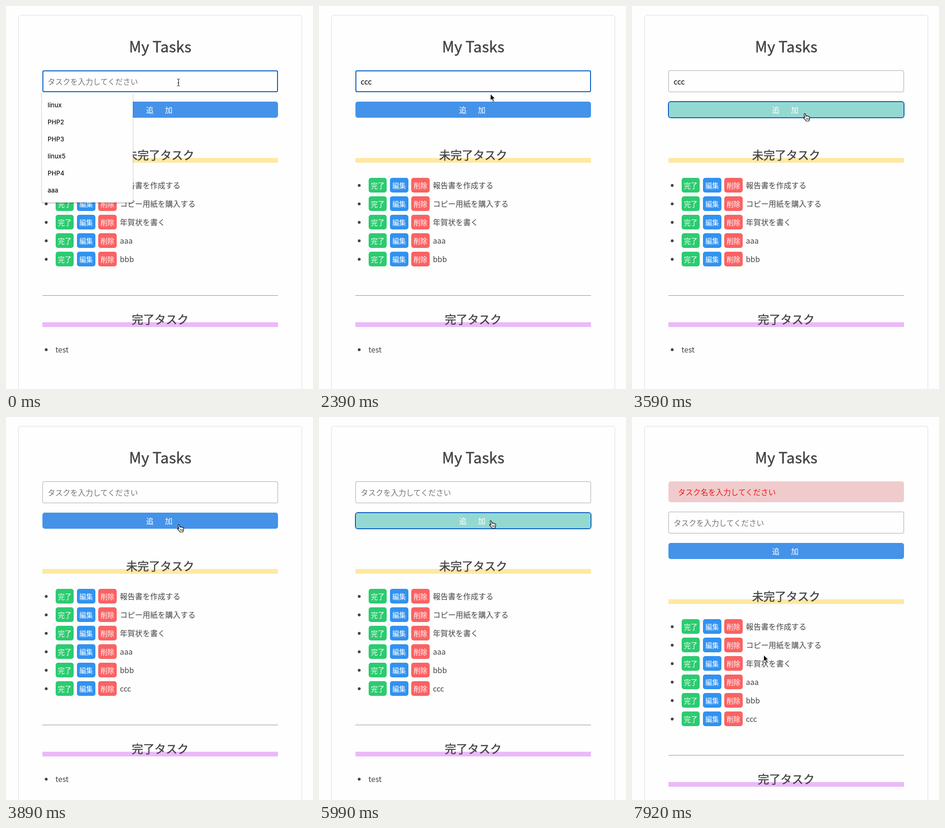
Animation, 649 px wide and 809 px high, one loop 8000 ms. Source, as an HTML page:

```html
<!DOCTYPE html>
<html lang="ja">
<head>
<meta charset="utf-8">
<title>My Tasks</title>
<style>
html, body { margin: 0; width: 100%; height: 100%; overflow: hidden; background: #fefefe; }
#stage { position: relative; width: 649px; height: 809px; overflow: hidden;
  font: 16px/30px "Noto Sans CJK JP", "Noto Sans CJK", "Noto Sans", sans-serif; color: #444; }
#stage * { box-sizing: border-box; }
#stage div, #stage svg { position: absolute; white-space: pre; }
#card { left: 26px; top: 19px; width: 600px; height: 900px; border: 1px solid #ddd; border-radius: 5px; }
#page, #lower { left: 0; top: 0; width: 649px; height: 900px; }
.wide { left: 77px; width: 498px; }
.head { text-align: center; -webkit-text-stroke: .55px #444; }
#title { top: 60px; line-height: 48px; font-size: 32px; }
#error { top: 136px; height: 44px; padding-left: 20px; border-radius: 5px;
  background: #f0cbcc; color: #f0161c; line-height: 44px; }
#field { top: 136px; height: 46px; padding-left: 10px; border: 1px solid #aaa; border-radius: 3px;
  color: #000; line-height: 44px; }
#field.empty { color: #757575; }
#field.focus { padding-left: 9px; border: 2px solid #0a5fc4; line-height: 42px; }
#caret { top: 147px; width: 1px; height: 24px; background: #000; }
#add { top: 202px; height: 34px; border-radius: 5px; background: #4493e9; color: #fff;
  text-align: center; line-height: 34px; letter-spacing: 4px; }
#add.hover { background: #94d9d1; }
#add.ring { box-shadow: 0 0 0 1px #0a5fc4, inset 0 0 0 1px #0a5fc4; }
.band { height: 10.5px; }
.sub { font-size: 24px; line-height: 36px; }
.row { left: 0; width: 600px; height: 31px; line-height: 31px; }
.dot { left: 82px; top: 13px; width: 6px; height: 6px; border-radius: 50%; background: #444; }
.btn { top: 0; width: 38.8px; height: 31px; border-radius: 5px; color: #fff;
  font-size: 14.4px; line-height: 31px; text-align: center; }
.label { top: 0; }
#rule { top: 611px; height: 1px; background: #929292; }
#drop { left: 76px; top: 183px; width: 192px; padding: 8px 12px; background: #fefefe;
  border-radius: 0 0 4px 4px; box-shadow: 0 1px 3px rgba(0,0,0,.4);
  clip-path: inset(0 -5px -5px -5px); color: #111;
  font: 500 13px/36px Inter, "Liberation Sans", sans-serif; letter-spacing: .1px; }
#stage svg { left: 0; top: 0; width: 18px; height: 20px; overflow: visible; }
</style>
</head>
<body>
<div id="stage">
  <div id="card"></div>
  <div id="title" class="wide head">My Tasks</div>
  <div id="error" class="wide">タスク名を入力してください</div>
  <div id="page">
    <div id="field" class="wide"></div>
    <div id="caret"></div>
    <div id="add" class="wide">追　加</div>
    <div class="wide band" style="top:320.5px;background:#ffe8a1"></div>
    <div class="wide head sub" style="top:296px">未完了タスク</div>
    <div id="lower">
      <div id="rule" class="wide"></div>
      <div class="wide band" style="top:667.5px;background:#ebb9f9"></div>
      <div class="wide head sub" style="top:643px">完了タスク</div>
    </div>
  </div>
  <div id="drop"></div>
  <svg id="beam" fill="none" stroke-linecap="round">
    <g id="beamLine"><path d="M1 1Q3.5 1 3.5 3Q3.5 1 6 1M3.5 3V14M1 16Q3.5 16 3.5 14Q3.5 16 6 16M2.2 9.5H4.8"/></g>
  </svg>
  <svg id="arrow"><path d="M1.5 1V14.3L4.6 11.4 6.8 16.8 9.1 15.8 6.9 10.6H11.2Z" fill="#000" stroke="#fff"
    style="filter:drop-shadow(0 1px 1px rgba(0,0,0,.3))"/></svg>
  <svg id="hand" stroke="#000" stroke-linecap="round" stroke-linejoin="round">
    <path fill="#fff" stroke-width="1.2" d="M4.8 10.2 2.8 3.4C2.2 1 4.8.3 5.5 2.5L6.8 6.8C7.3 5.4 9.3 5.7 9.5 7 10.2 6 12 6.4 12.1 7.8 13 7 14.4 7.6 14.5 9V12C14.5 14 13.2 15 13 17H6.8C6.2 14.9 3 12.6 1.6 10.4 1 8.8 2.8 8.2 4.8 10.2Z"/>
    <path fill="none" stroke-width=".9" d="M7.8 11V14M9.9 11V14M12 11V14"/>
  </svg>
</div>
<script>
const $ = id => document.getElementById(id);
const LOOP = 8000;
const HINT = 'タスクを入力してください';
const PAST = ['linux', 'PHP2', 'PHP3', 'linux5', 'PHP4', 'aaa'];
const BUTTONS = [['完了', '#2ccb70'], ['編集', '#3192f0'], ['削除', '#fa6263']];
const TASKS = ['報告書を作成する', 'コピー用紙を購入する', '年賀状を書く', 'aaa', 'bbb', 'ccc'];

function div(parent, cls, style = {}, text = '') {
  const el = document.createElement('div');
  el.className = cls;
  el.textContent = text;
  Object.assign(el.style, style);
  return parent.appendChild(el);
}

function addRow(parent, top, text, buttons) {
  const row = div(parent, 'row', { top: top + 'px' });
  div(row, 'dot');
  buttons.forEach(([name, color], i) =>
    div(row, 'btn', { left: 104.7 + 45.2 * i + 'px', background: color }, name));
  div(row, 'label', { left: (buttons.length ? 240.7 : 104.5) + 'px' }, text);
  return row;
}

const rows = TASKS.map((task, i) => addRow($('page'), 363 + 39 * i, task, BUTTONS));
addRow($('lower'), 710, 'test', []);

// White halo under the text cursor
const line = $('beamLine').firstElementChild;
const halo = line.cloneNode();
halo.setAttribute('stroke', '#fff');
halo.setAttribute('stroke-width', 2.4);
line.setAttribute('stroke', '#000');
line.before(halo);

// Each step changes part of the state; caret 0 means hidden
const start = {
  text: '', drop: PAST, focus: true, caret: 0, hover: false, ring: false,
  added: false, error: false, cursor: ['beam', 361, 153]
};
const steps = [
  [600, { caret: 88 }],
  [1050, { caret: 0 }],
  [1500, { text: 'c', caret: 96, drop: ['ccc'] }],
  [1640, { text: 'cc', caret: 103 }],
  [1790, { text: 'ccc', caret: 111, drop: [] }],
  [2240, { caret: 0 }],
  [2390, { cursor: ['arrow', 361, 185] }],
  [2540, { hover: true, cursor: ['hand', 361, 224] }],
  [2690, { caret: 111, cursor: ['hand', 361, 226] }],
  [3290, { caret: 0 }],
  [3590, { focus: false, ring: true }],
  [3890, { text: '', hover: false, ring: false, added: true }],
  [5240, { hover: true, cursor: ['hand', 360, 219] }],
  [5390, { cursor: ['hand', 359, 218] }],
  [5990, { ring: true }],
  [6130, { hover: false, ring: false, error: true }],
  [7180, { cursor: ['beam', 361, 211] }],
  [7320, { cursor: ['arrow', 379, 345] }],
  [7470, { cursor: ['beam', 368, 472] }],
  [7620, { cursor: ['arrow', 356, 493] }],
  [7920, { cursor: ['arrow', 277, 502] }]
];

const show = (el, on) => { el.style.display = on ? '' : 'none'; };
const shift = (el, x, y) => { el.style.transform = `translate(${x}px,${y}px)`; };

function render(s) {
  const field = $('field');
  field.textContent = s.text || HINT;
  field.classList.toggle('empty', !s.text);
  field.classList.toggle('focus', s.focus);
  $('add').classList.toggle('hover', s.hover);
  $('add').classList.toggle('ring', s.ring);
  $('caret').style.left = s.caret + 'px';
  show($('caret'), s.caret);
  $('drop').textContent = s.drop.join('\n');
  show($('drop'), s.drop.length);
  show($('error'), s.error);
  show(rows[5], s.added);
  shift($('page'), 0, s.error ? 64 : 0);
  shift($('lower'), 0, s.added ? 39 : 0);
  const [kind, x, y] = s.cursor;
  for (const id of ['beam', 'arrow', 'hand']) show($(id), id === kind);
  shift($(kind), x, y);
}

const origin = performance.now();
let last = -1;
function tick() {
  const t = (performance.now() - origin) % LOOP;
  const past = steps.filter(([at]) => at <= t);
  if (past.length !== last) {
    last = past.length;
    render(Object.assign({}, start, ...past.map(([, change]) => change)));
  }
  requestAnimationFrame(tick);
}
tick();
</script>
</body>
</html>
```
